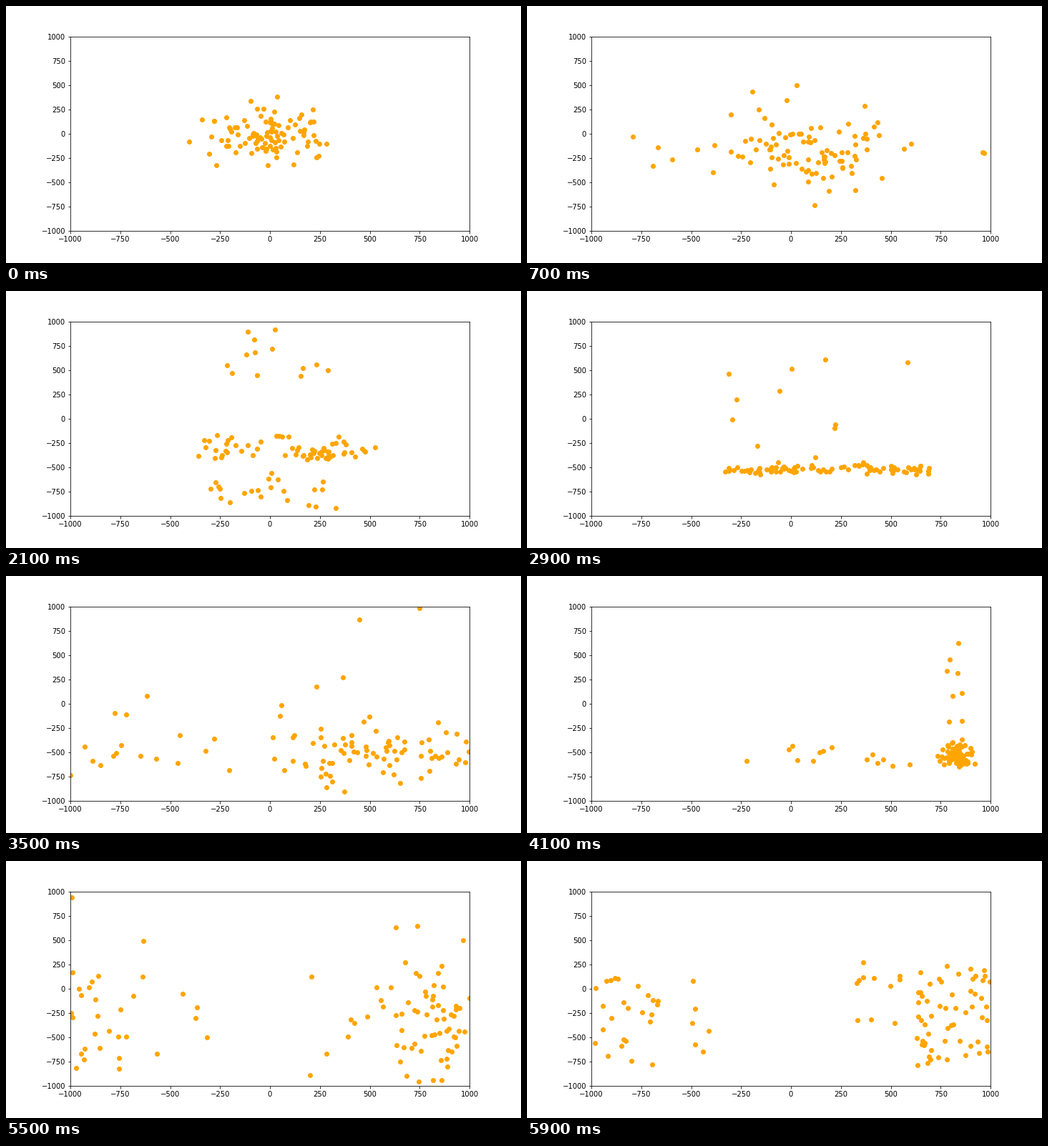
A matplotlib script that plays this animation: 720x360 px, repeating every 6 s.

```python
import numpy as np
import matplotlib.pyplot as plt
from matplotlib.animation import FuncAnimation

COUNT = 100
FRAMES = 60
HALF = 1000
KEYS = np.array([0, 14, 21, 29, 41, 50, 59])
SWING = (200, 140)

rng = np.random.default_rng(7)


def blob(n, center, spread):
    """Round cluster, cut off so that no point lands far outside."""
    return center + np.clip(rng.normal(size=(n, 2)), -2.6, 2.6) * spread


def strip(n, xs, ys):
    """Even scatter over a rectangle."""
    return np.column_stack([rng.uniform(*xs, n), rng.uniform(*ys, n)])


def sweep(n, center, reach, spread):
    """Points swinging sideways, crowded at the two turning points."""
    points = blob(n, center, spread)
    points[:, 0] += reach * np.cos(rng.uniform(0, np.pi, n))
    return points


def pose(*groups):
    """Join the groups, fill up with the last one, mix the order."""
    return rng.permutation(np.vstack(groups)[:COUNT])


def wrap(p):
    return (p + HALF) % (2 * HALF) - HALF


start = pose(blob(COUNT, (10, 10), (165, 165)))

cross = pose(
    strip(25, (-1000, 1000), (-420, -280)),
    strip(20, (40, 270), (-965, 530)),
    blob(COUNT, (165, -345), (52, 40)))

scattered = pose(
    strip(13, (-230, 310), (405, 960)),
    strip(22, (-300, 350), (-980, -540)),
    strip(40, (-370, 545), (-410, -160)),
    blob(COUNT, (265, -350), (65, 40)))

band = pose(
    strip(11, (-340, 590), (-400, 650)),
    sweep(COUNT, (190, -520), 480, (28, 30)))

corner = pose(
    strip(14, (-300, 750), (-650, -430)),
    strip(8, (780, 870), (-240, 635)),
    blob(COUNT, (828, -535), (36, 65)))

column = pose(
    strip(7, (-320, 210), (-960, 890)),
    strip(9, (-1000, -905), (-170, 0)),
    strip(17, (855, 960), (800, 1000)),
    blob(10, (960, -740), (22, 70)),
    blob(20, (885, -50), (19, 40)),
    strip(COUNT, (855, 920), (-1000, 10)))

spread = pose(
    strip(6, (-520, -380), (-670, 300)),
    strip(25, (-1000, -665), (-790, 130)),
    strip(11, (310, 585), (-370, 280)),
    strip(22, (630, 705), (-810, 240)),
    strip(COUNT, (735, 1000), (-850, 330)))

# Unroll the poses so each point takes the short way round the edges.
path = [start]
for target in (cross, scattered, band, corner, column, spread):
    path.append(path[-1] + wrap(target - path[-1]))
path = np.array(path)
slope = np.gradient(path, KEYS, axis=0)
swing = rng.normal(size=(len(KEYS) - 1, COUNT, 2)) * SWING


def positions(frame):
    k = min(np.searchsorted(KEYS, frame, side="right") - 1, len(KEYS) - 2)
    span = KEYS[k + 1] - KEYS[k]
    u = (frame - KEYS[k]) / span
    ease = u * u * (3 - 2 * u)
    p = path[k] + (path[k + 1] - path[k]) * ease
    p = p + span * u * (1 - u) * (slope[k] * (1 - u) - slope[k + 1] * u)
    return wrap(p + swing[k] * np.sin(np.pi * u))


fig, ax = plt.subplots(figsize=(10, 5), dpi=72)
fig.subplots_adjust(left=0.125, right=0.9, bottom=0.125, top=0.88)
ticks = range(-HALF, HALF + 1, 250)
ax.set(xlim=(-HALF, HALF), ylim=(-HALF, HALF), xticks=ticks, yticks=ticks)
dots, = ax.plot([], [], "o", color="orange", markersize=6)


def draw(frame):
    dots.set_data(*positions(frame).T)
    return dots,


anim = FuncAnimation(fig, draw, frames=FRAMES, interval=100, repeat=True,
                     repeat_delay=0)
plt.show()
```
